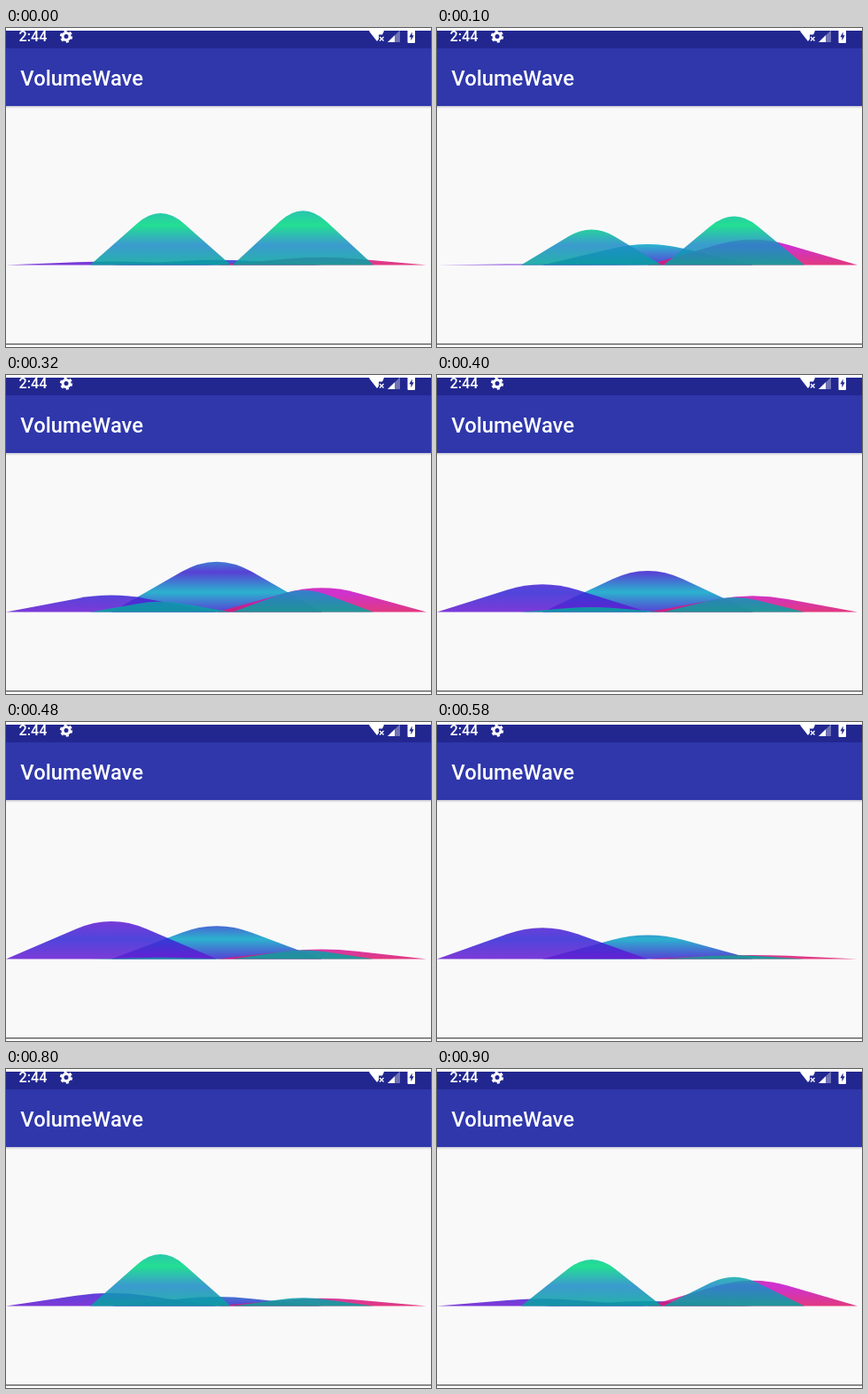
Recreate the animation shown at these times as an HTML page. Size 480 by 360 pixels, loop 920 ms.

```html
<!DOCTYPE html>
<html lang="en">
<head>
<meta charset="utf-8">
<title>VolumeWave</title>
<style>
  html, body { margin: 0; width: 100%; height: 100%; overflow: hidden; background: #fff; }
  svg { display: block; width: 480px; height: 360px; }
  text { font-family: Roboto, sans-serif; font-weight: 500; fill: #fff; }
</style>
</head>
<body>
<svg viewBox="0 0 480 360">
  <defs>
    <linearGradient id="shadow" x2="0" y2="1">
      <stop stop-color="#cfcfd4"/>
      <stop offset="1" stop-color="#f9f9f9"/>
    </linearGradient>
    <clipPath id="screen"><rect y="3" width="480" height="355"/></clipPath>
  </defs>
  <g clip-path="url(#screen)">
    <rect y="3" width="480" height="353" fill="#f9f9f9"/>
    <rect y="3" width="480" height="20" fill="#222790"/>
    <rect y="23" width="480" height="65.3" fill="#2f37ab"/>
    <rect y="88.3" width="480" height="2.7" fill="url(#shadow)"/>
    <rect y="356" width="480" height="1.5" fill="#666"/>

    <text x="14.5" y="15.4" font-size="16.2">2:44</text>
    <g transform="translate(68 9.5)" fill="none" stroke="#fff">
      <circle r="4" stroke-width="3"/>
      <circle r="6" stroke-width="2.4" stroke-dasharray="3.1 3.183"/>
    </g>
    <g fill="#fff" transform="translate(0 .5)">
      <path d="M410 3Q418 -2 427 3L425 7H421V12L419 14.5Z"/>
      <path d="M422 9.5l4.5 4.5m0-4.5l-4.5 4.5" stroke="#fff" stroke-width="1.4"/>
      <path d="M431 15.5L445 2V15.5Z" opacity=".35"/>
      <path d="M431 15.5L439 7.8V15.5Z"/>
      <rect x="453.5" y="1" width="8.5" height="15.5" rx="1"/>
      <path d="M458.6 4l-3.2 5.8h2v4l3.2-6h-2z" fill="#222790"/>
    </g>
    <text x="16.3" y="65" font-size="23.75">VolumeWave</text>
    <g id="waves" fill-opacity=".86"></g>
  </g>
</svg>
<script>
const LOOP = 920, STEP = 20, BASE = 267.5, GRADIENT_TOP = 200;

// Colours run upwards from the base line.
const blue = ['#3d23cf', '#0aa6c8', '#3d23cf', '#0aa6c8'];
const purple = ['#681ad2', '#3328d6', '#681ad2', '#3328d6'];
const pink = ['#dd1a6b', '#c611cb', '#dd1a6b', '#c611cb'];
const green = ['#02a69b', '#1c8bc8', '#00da82', '#0cb0b0'];

// Back to front; each wave rises and falls once per period.
const waves = [
  { left: 119, right: 357, height: 57, period: 1190, start: -30,  colors: blue },
  { left: 0,   right: 238, height: 45, period: 990,  start: 210,  colors: purple },
  { left: 238, right: 475, height: 45, period: 800,  start: -40,  colors: pink },
  { left: 95,  right: 254, height: 66, period: 870,  start: -291, colors: green },
  { left: 256, right: 415, height: 67, period: 1036, start: -272, colors: green },
];

const group = document.getElementById('waves');
group.innerHTML = waves.map(({ colors }, i) => `
  <linearGradient id="fill${i}" gradientUnits="userSpaceOnUse"
    x1="0" x2="0" y1="${BASE}" y2="${GRADIENT_TOP}">
    ${colors.map((color, n) => `<stop offset="${n / 3}" stop-color="${color}"/>`).join('')}
  </linearGradient>
  <path fill="url(#fill${i})"/>`).join('');
const paths = group.querySelectorAll('path');

// Decelerating progress through 0 -> 1 -> 0.
function level(time, { start, period }) {
  const p = ((time - start) / period % 1 + 1) % 1;
  const eased = 1 - (1 - p) ** 2;
  return 1 - Math.abs(2 * eased - 1);
}

// Straight flanks up to two thirds of the apex, joined by a rounded top.
function hill({ left, right }, height) {
  const apex = height * 1.2;
  const inset = (right - left) / 3;
  const shoulder = BASE - apex * 2 / 3;
  return `M${left} ${BASE}L${left + inset} ${shoulder}` +
    `Q${(left + right) / 2} ${BASE - apex} ${right - inset} ${shoulder}L${right} ${BASE}Z`;
}

function draw() {
  const time = Math.floor(performance.now() % LOOP / STEP) * STEP;
  waves.forEach((wave, i) =>
    paths[i].setAttribute('d', hill(wave, wave.height * level(time, wave))));
  requestAnimationFrame(draw);
}
draw();
</script>
</body>
</html>
```
